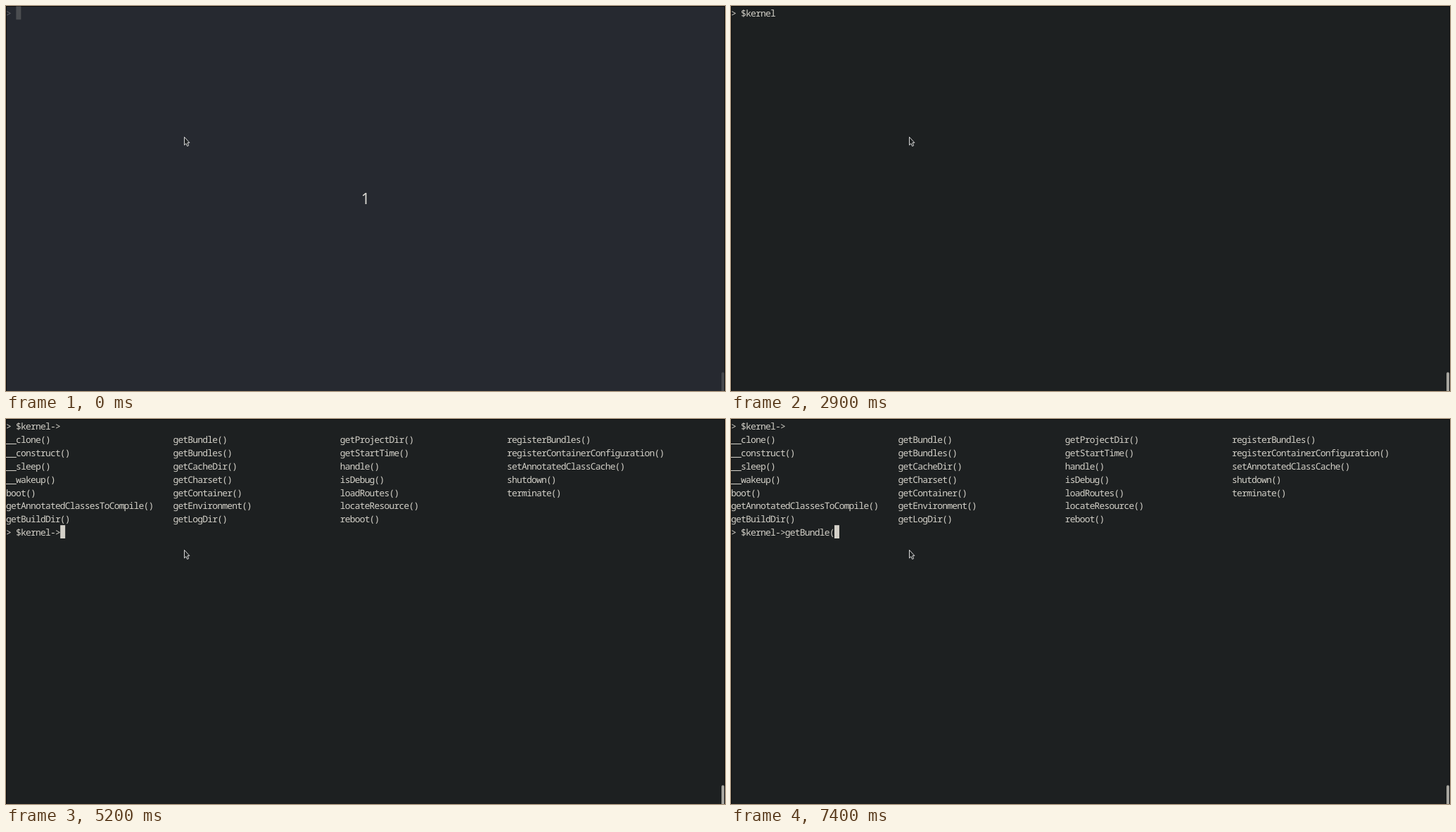
Write an HTML page that moves like this. It is 1022 px wide and 548 px high and loops after 8 s.

```html
<!DOCTYPE html>
<html lang="en">
<head>
<meta charset="utf-8">
<title>Interactive shell</title>
<style>
  html, body { margin: 0; width: 100%; height: 100%; overflow: hidden; background: #1d2021; }
  svg { display: block; width: 1022px; height: 548px; }
  .mono {
    font: 13px "Noto Sans Mono", "DejaVu Sans Mono", monospace;
    letter-spacing: -0.82px;
    white-space: pre;
    font-variant-ligatures: none;
    text-rendering: geometricPrecision;
    fill: #d3d0c8;
  }
  .count { font: 21px "Noto Sans", "Open Sans", sans-serif; fill: #dcdad4; text-anchor: middle; }
</style>
</head>
<body>
<svg viewBox="0 0 1022 548">
  <rect id="back" width="1022" height="548"/>
  <path d="M0.5 548V0.5H1021.5V548" fill="none" stroke="#0b0c0d"/>
  <rect id="bar" x="1017" y="521.2" width="4" height="30" rx="2"/>
  <g id="screen">
    <text id="first" class="mono"></text>
    <g id="list"></g>
    <text id="second" class="mono"></text>
  </g>
  <rect id="cursor" width="6.98" height="18.83"/>
  <text id="count" class="count" x="511" y="282">1</text>
  <path d="M253.5 186.5V198L256 195.7L257.6 199.5L259.6 198.7L258 194.7H261Z"
        fill="#1d2021" stroke="#d8d8d8" stroke-width="1"/>
</svg>
<script>
const LOOP = 8000, CELL = 6.98, ROW = 18.83, LEFT = 0.4, TOP = 0.5;
const BASE = 15.35, TEXT_LEFT = 0.1; // text starts earlier, as its tightened glyphs sit right of centre
const $ = id => document.getElementById(id);

const columns = [
  "__clone __construct __sleep __wakeup boot getAnnotatedClassesToCompile getBuildDir",
  "getBundle getBundles getCacheDir getCharset getContainer getEnvironment getLogDir",
  "getProjectDir getStartTime handle isDebug loadRoutes locateResource reboot",
  "registerBundles registerContainerConfiguration setAnnotatedClassCache shutdown terminate"
];

// [start ms, typed text, cursor shown]
const steps = [
  [0, "", 1],
  [600, "", 0],
  [1400, "$", 1],
  [1800, "$k", 1],
  [2000, "$ker", 1],
  [2400, "$kernel ", 1],
  [2900, "$kernel ", 0],
  [3000, "$kernel ", 1],
  [3100, "$kernel", 1],
  [3300, "$kernel-", 1],
  [3700, "$kernel->", 1],
  [5000, "$kernel->", 0],
  [5200, "$kernel->", 1],
  [5300, "$kernel->g", 1],
  [5400, "$kernel->ge", 1],
  [5500, "$kernel->get", 1],
  [6000, "$kernel->getB", 1],
  [6200, "$kernel->getBu", 1],
  [6500, "$kernel->getBun", 1],
  [6600, "$kernel->getBundle", 1],
  [7000, "$kernel->getBundle", 0],
  [7100, "$kernel->getBundle", 1],
  [7400, "$kernel->getBundle(", 1]
];
const INTRO_END = 100, LIST_AT = 4500, LIST_ROWS = 8;

function place(el, col, row, left = TEXT_LEFT, top = BASE) {
  el.setAttribute("x", left + col * CELL);
  el.setAttribute("y", top + row * ROW);
}

function show(el, on) {
  el.setAttribute("visibility", on ? "visible" : "hidden");
}

columns.forEach((names, c) => names.split(" ").forEach((name, r) => {
  const el = document.createElementNS("http://www.w3.org/2000/svg", "text");
  el.setAttribute("class", "mono");
  el.textContent = name + "()";
  place(el, c * 34, r + 1);
  $("list").append(el);
}));
place($("first"), 0, 0);
place($("second"), 0, LIST_ROWS);

function draw(t) {
  const [, typed, shown] = steps.findLast(s => s[0] <= t);
  const intro = t < INTRO_END, listed = t >= LIST_AT;

  $("first").textContent = "> " + (listed ? "$kernel->" : typed);
  $("second").textContent = listed ? "> " + typed : "";
  show($("list"), listed);

  const cursor = $("cursor");
  place(cursor, typed.length + 2, listed ? LIST_ROWS : 0, LEFT, TOP);
  show(cursor, shown);
  cursor.setAttribute("fill", intro ? "#4b4d50" : "#d3d0c8");

  $("back").setAttribute("fill", intro ? "#262930" : "#1d2021");
  $("bar").setAttribute("fill", intro ? "#45484c" : "#a6a59f");
  $("screen").setAttribute("opacity", intro ? 0.35 : 1);
  show($("count"), intro);
}

const start = performance.now();
function tick(now) {
  draw(Math.max(0, now - start) % LOOP);
  requestAnimationFrame(tick);
}
draw(0);
requestAnimationFrame(tick);
</script>
</body>
</html>
```
